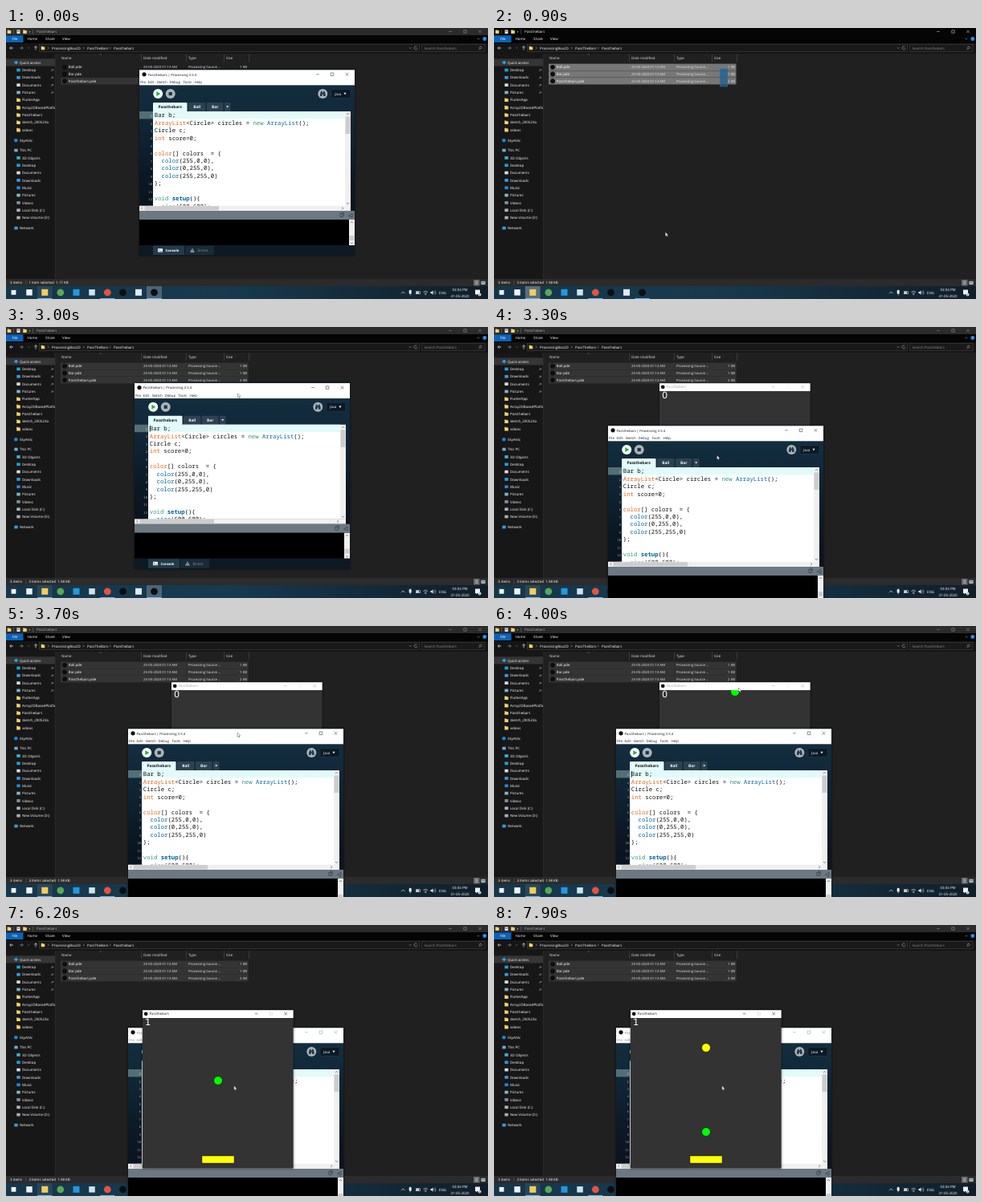
An HTML page for the animation above (8000 ms loop, 600 px wide and 338 px high).

```html
<!DOCTYPE html>
<html lang="en">
<head>
<meta charset="utf-8">
<title>Passthebars</title>
<style>
html, body { margin: 0; width: 100%; height: 100%; overflow: hidden; background: #000; }
svg { display: block; width: 100vw; height: 100vh; }
text { font-family: "Open Sans", "Noto Sans", sans-serif; white-space: pre; text-rendering: geometricPrecision; }
.code { font-family: "Noto Sans Mono", "DejaVu Sans Mono", monospace; }
.score { font-family: "DejaVu Sans", sans-serif; }
.shadow { filter: drop-shadow(0 .6px 1.6px rgba(0, 0, 0, .6)); }
</style>
</head>
<body>
<svg id="stage" viewBox="0 0 600 338" xmlns="http://www.w3.org/2000/svg">
  <defs>
    <linearGradient id="bar"><stop stop-color="#16364a"/><stop offset=".45" stop-color="#173a50"/><stop offset="1" stop-color="#101e29"/></linearGradient>
    <linearGradient id="navy" x2="0" y2="1"><stop stop-color="#15303f"/><stop offset=".22" stop-color="#11293b"/><stop offset=".6" stop-color="#0b1722"/><stop offset="1" stop-color="#080f17"/></linearGradient>
    <clipPath id="sideClip"><rect y="32" width="61" height="281"/></clipPath>
    <clipPath id="codeClip"><rect width="256" height="169.7"/></clipPath>
    <clipPath id="fieldClip"><rect y="10" width="187.6" height="187.6"/></clipPath>
  </defs>
  <g id="explorer"></g>
  <g id="taskbar"></g>
  <g id="windows"><g id="sketch"></g><g id="ide"></g></g>
  <path id="pointer" d="M0 0V5.2L1.2 4.2L2 6L2.9 5.6L2.1 3.9H3.7Z" fill="#fff" stroke="#111" stroke-width=".35"/>
</svg>
<script>
const LOOP = 8000, STEP = 100;
const $ = id => document.getElementById(id);

const rect = (x, y, w, h, fill, extra = '') =>
  `<rect x="${x}" y="${y}" width="${w}" height="${h}" fill="${fill}" ${extra}/>`;
const dot = (x, y, r, fill, extra = '') => `<circle cx="${x}" cy="${y}" r="${r}" fill="${fill}" ${extra}/>`;
const line = (d, stroke, width = .5, extra = '') =>
  `<path d="${d}" fill="none" stroke="${stroke}" stroke-width="${width}" ${extra}/>`;
const shape = (d, fill) => `<path d="${d}" fill="${fill}"/>`;
const text = (x, y, s, fill = '#fff', size = 4.45, extra = '') =>
  `<text x="${x}" y="${y}" font-size="${size}" fill="${fill}" ${extra}>${s.replace(/</g, '&lt;')}</text>`;
const END = 'text-anchor="end"', MID = 'text-anchor="middle"', BOLD = 'font-weight="700"';
const OUTLINE = 'stroke="#000" stroke-width=".35"';

const folder = (x, y) => shape(`M${x - 2.3} ${y - 2.3}h2l.6 .7h2v3.9h-4.6z`, '#f6d26b');

// minimise, maximise and close glyphs centred on three x positions
const controls = (xs, y, r, stroke, midStroke = stroke) =>
  line(`M${xs[0] - r} ${y}h${2 * r}`, stroke) +
  line(`M${xs[1] - r} ${y - r}h${2 * r}v${2 * r}h${-2 * r}z`, midStroke) +
  line(`M${xs[2] - r} ${y - r}l${2 * r} ${2 * r}m0 ${-2 * r}l${-2 * r} ${2 * r}`, stroke);

function drawExplorer() {
  let s = rect(0, 0, 600, 322, '#202020') + rect(0, 0, 600, 32, '#050505') + rect(0, 0, 600, 9, '#2b2b2b', 'id="exBar"') + rect(0, 19, 600, 13, '#151515');
  s += folder(4, 4.7) + line('M9.5 2v5.5', '#777') + rect(13.5, 2.4, 4, 4.6, '#eee') + rect(14.5, 3.4, 2, 1.6, '#d65a3a') +
    folder(23.5, 4.7) + text(28.5, 6.3, '▾', '#bbb', 3.5) + line('M33.5 2v5.5', '#777');
  s += `<g id="exTitle">${text(38, 6.4, 'Passthebars')}${controls([553, 571.5, 590], 4.5, 1.7, '#eee')}</g>`;
  s += rect(0, 9.3, 21.5, 8.7, '#0a63b8') + text(7.5, 15.3, 'File');
  [['Home', 26.5], ['Share', 49], ['View', 70]].forEach(([label, x]) => s += text(x, 15.3, label));
  s += line('M586.5 12.8l1.5 1.5l1.5 -1.5', '#bbb') + dot(595.8, 13.6, 2.5, '#1683dc') + text(595.8, 15, '?', '#fff', 3.8, MID);

  s += line('M9 25H4.8m1.8 -1.8l-1.8 1.8l1.8 1.8', '#eee', .7) + line('M17 25h4.2m-1.8 -1.8l1.8 1.8l-1.8 1.8', '#999', .7) +
    line('M27 24.3l1.2 1.2l1.2 -1.2', '#999') + line('M37 27.5v-4.8m-1.8 1.8l1.8 -1.8l1.8 1.8', '#eee', .7);
  s += rect(41.5, 20.3, 473, 9.4, '#191919', 'stroke="#4a4a4a" stroke-width=".5"') +
    rect(517.5, 20.3, 78.5, 9.4, '#191919', 'stroke="#4a4a4a" stroke-width=".5"') + folder(46, 25);
  [['ProcessingBox2D', 57], ['PassTheBars', 101], ['Passthebars', 134]].forEach(([label, x]) =>
    s += text(x, 26.6, label) + line(`M${x - 5} 23.6l1.3 1.4l-1.3 1.4`, '#bbb'));
  s += line('M502 24.3l1.3 1.3l1.3 -1.3', '#ccc') + line('M511.5 23.6a1.9 1.9 0 1 0 .4 1.7', '#ccc') +
    text(520.5, 26.6, 'Search Passthebars', '#8a8a8a') + dot(590.8, 24.5, 1.4, 'none', 'stroke="#bbb" stroke-width=".5"') + line('M589.8 25.5l-1.5 1.6', '#bbb');

  s += rect(0, 32, 61, 281, '#171717') + line('M61.2 32V313', '#353535');
  const side = (y, label, x = 20, color = '') => {
    const ix = x - 4.5;
    return (color ? rect(ix - 2.2, y - 1.9, 4.4, 3.7, color) : folder(ix, y)) + text(x, y + 1.6, label);
  };
  let nav = rect(0, 38.3, 61, 9.2, '#353535') + shape('M9.7 43l3 -2.4l2.6 2.4l-2.6 2.4z', '#2e9be8') + text(17, 44.7, 'Quick access');
  const items = (top, list) => list.forEach(([label, color], i) => nav += side(top + i * 9.33, label, 20, color));
  items(52.5, [['Desktop', '#1ba5dc'], ['Downloads', '#3b9ce2'], ['Documents', '#d9e0e5'], ['Pictures', '#83b7cf'],
    ['FlutterApp'], ['Array2DBasedPlatformer'], ['Passthebars'], ['sketch_200523a'], ['videos']]);
  for (let i = 0; i < 4; i++) nav += line(`M56.2 ${54 + i * 9.33}l1.4 -1.4m-.6 -1.1l1.7 1.7m-.9 -1.9l1.3 1.3`, '#ccc', .6);
  nav += dot(12.3, 140.2, 2.3, '#1688d8') + text(17, 141.8, 'SkyAttic') + side(152.6, 'This PC', 17, '#6eaad0');
  items(162, [['3D Objects', '#3eb3d4'], ['Desktop', '#1ba5dc'], ['Documents', '#d9e0e5'], ['Downloads', '#3b9ce2'],
    ['Music', '#2586d6'], ['Pictures', '#83b7cf'], ['Videos', '#8493a0'], ['Local Disk (C:)', '#a9bac5'], ['New Volume (D:)', '#b0b0b0']]);
  nav += side(249.6, 'Network', 17, '#3d9bd6');
  s += `<g clip-path="url(#sideClip)">${nav}</g>`;

  [['Name', 69], ['Date modified', 171], ['Type', 227], ['Size', 274]].forEach(([label, x]) => s += text(x, 38.7, label, '#e4e4e4'));
  [168.5, 224.5, 271.5, 302.5].forEach(x => s += line(`M${x} 32.5V42`, '#555'));
  s += line('M116.2 33.8l1.4 -1.2l1.4 1.2', '#999', .4);
  [['Ball.pde', 1], ['Bar.pde', 1], ['Passthebars.pde', 2]].forEach(([name, kb], i) => {
    const y = 48.8 + i * 8.7;
    const cell = (x, label, extra) => text(x, y + 1.6, label, '#e8e8e8', 4.25, extra);
    s += rect(68, y - 4.2, 233.5, 8.4, '#333', 'class="row"') + dot(73, y, 2.9, '#0d0d0d') + text(77.8, y + 1.6, name) +
      cell(171, '25-05-2020 01:13 AM') + cell(227, 'Processing Source ...') + cell(300, kb + ' KB', END);
  });
  s += rect(281.3, 51, 9.5, 22, '#1f618f', 'id="marquee" fill-opacity=".75" stroke="#1a75b8" stroke-width=".5"');
  s += rect(0, 313, 600, 9, '#2b2b2b') + text(5, 319.4, '3 items') + line('M24.8 315v5.5', '#666') +
    `<text id="status" x="28.5" y="319.4" font-size="4.45" fill="#fff"></text>`;
  s += rect(582, 314, 7.5, 7.5, '#686868') + line('M584 316h3.5m-3.5 1.7h3.5m-3.5 1.7h3.5', '#eee') + rect(591.5, 315.8, 5, 4, '#ddd') + rect(592.2, 316.5, 3.6, 2, '#4a8fae');
  $('explorer').innerHTML = s;
}

function drawTaskbar() {
  let s = rect(0, 322, 600, 16, 'url(#bar)') + rect(38.8, 322, 18.8, 16, '#fff', 'id="exTask"') + rect(175, 322, 19, 16, '#fff', 'id="ideTask"');
  [[9.5, '#f4f7fa', 5.8], [29, '#eef1f3', 7.5], [48.3, '#f4cd5b', 8], [87.5, '#2298dc', 8], [107, '#cfe3ef', 7.5], [165, '#dfeaf4', 8]]
    .forEach(([x, color, size]) => s += rect(x - size / 2, 329.8 - size / 2, size, size, color));
  [[67.8, '#57a956'], [126.3, '#e4533f'], [145.5, '#0c0f12'], [184.5, '#0c0f12']].forEach(([x, color]) => s += dot(x, 329.8, 4.4, color));
  [48.3, 126.3, 184.5].forEach(x => s += rect(x - 9, 337, 18, 1, '#76b9ed'));
  s += line('M492 331.2l2.3 -2.3l2.3 2.3', '#eee', .7) + rect(501.7, 326.8, 3, 5, '#eee', 'rx="1.2"') + line('M503.2 331.5v2', '#eee') +
    rect(510.5, 328.7, 5, 3, 'none', 'stroke="#eee" stroke-width=".6"') + rect(511, 329.2, 3, 2, '#eee') +
    line('M519.5 329.5a4 4 0 0 1 5.6 0m-4.3 1.5a2.4 2.4 0 0 1 3 0', '#ddd', .7) + dot(522.3, 332.4, .7, '#eee') +
    shape('M528.5 329h1.3l1.7 -1.6v5.2l-1.7 -1.6h-1.3z', '#eee') + line('M532.6 328.4a2.5 2.5 0 0 1 0 3.2m1.3 -4.3a4 4 0 0 1 0 5.4', '#ddd');
  s += text(539, 331.8, 'ENG') + text(565, 327.8, '03:04 PM', '#fff', 4.45, MID) + text(565, 335.5, '31-05-2020', '#fff', 4.45, MID);
  s += shape('M584 326.5h6v5.5h-3.5l-1.3 1.6v-1.6h-1.2z', '#f0f0f0') + dot(589.5, 332.6, 2, '#d9e4ea') + text(589.5, 333.8, '2', '#222', 3.2, MID);
  $('taskbar').innerHTML = s;
}

const INK = { o: '#e2661a', g: '#33997e', b: '#006699', k: '#111' };
const CODE = [
  'k:Bar b;',
  'o:ArrayList|k:<Circle> circles = |g:new |b:ArrayList|k:();',
  'k:Circle c;',
  'o:int|k: score=0;',
  '',
  'o:color|k:[] colors  = {',
  'b:  color|k:(255,0,0),',
  'b:  color|k:(0,255,0),',
  'b:  color|k:(255,255,0)',
  'k:};',
  '',
  'g:void |B:setup|k:(){',
  'b:  size|k:(600,600);'
];

function drawIde() {
  let s = rect(0, 0, 268, 232, 'url(#navy)', 'class="shadow"') + rect(0, .3, 268, 19, '#fff') + dot(6, 5.8, 2.6, '#111');
  s += `<g id="ideTitle">${text(10.5, 7.5, 'Passthebars | Processing 3.5.4', '#111', 4.25)}`;
  [['File', 1], ['Edit', 10.5], ['Sketch', 21.5], ['Debug', 37.5], ['Tools', 54.5], ['Help', 68.5]]
    .forEach(([label, x]) => s += text(x, 17.2, label, '#222', 4.35));
  s += controls([222, 240, 258.5], 5.8, 1.8, '#222') + '</g>';
  s += dot(23.2, 30, 6, '#fff') + shape('M21.3 27v6l5 -3z', '#20b23c') + dot(38.7, 30, 6, '#a9b5ba') + rect(36.6, 27.9, 4.2, 4.2, '#22333e');
  s += dot(228.3, 30, 6, '#a9b5ba') + shape('M225 33v-3l1.2 -3.3h1.4v1.8h1.4v-1.8h1.4l1.2 3.3v3h-2.6v-2.2h-1.4v2.2z', '#263944');
  s += rect(239, 24.5, 24, 11, '#0c1a26', 'rx="1" stroke="#29404f" stroke-width=".5"') + text(243, 31.7, 'Java', '#fff', 4.4) + shape('M254.5 28.8h3l-1.5 2.4z', '#fff');
  s += rect(17, 41, 42.5, 11.2, '#e3fbfa', 'rx="1"') + text(38.2, 47.8, 'Passthebars', '#111', 4.85, MID + ' ' + BOLD);
  [[61, 21.5, 'Ball'], [84, 20.5, 'Bar'], [106, 7.5, '']].forEach(([x, w, label]) =>
    s += rect(x, 41, w, 11, '#2d4251', 'rx="1"') + text(x + w / 2, 47.8, label, '#f0f4f5', 4.85, MID + ' ' + BOLD));
  s += shape('M108.2 45.2h3l-1.5 2.3z', '#e8eeee');

  s += rect(17, 52, 239, 118, '#fff') + rect(0, 52, 17, 9.4, '#526f76') + rect(17, 52, 239, 9.4, '#e2fbfa');
  s += '<g clip-path="url(#codeClip)">';
  CODE.forEach((row, i) => {
    const y = 59.4 + i * 9.43;
    s += text(16, y - .2, String(i + 1), i ? '#a3b3bb' : '#dce8ea', 3.9, END + ' class="code"');
    const spans = row ? row.split('|').map(part => {
      const key = part[0], body = part.slice(2).replace(/</g, '&lt;');
      return `<tspan fill="${INK[key.toLowerCase()]}"${key === 'B' ? ' ' + BOLD : ''}>${body}</tspan>`;
    }).join('') : '';
    s += `<text class="code" x="18.8" y="${y}" font-size="7.31">${spans}</text>`;
  });
  s += '</g>' + rect(18.8, 53, .8, 8, '#111', 'id="caret"');
  s += rect(256, 52, 7, 118, '#f0f0f0') + rect(256.5, 58.5, 6, 21.5, '#cdcdcd') + line('M258 56l1.5 -1.5l1.5 1.5M258 166l1.5 1.5l1.5 -1.5', '#555', .7);
  s += rect(0, 169.7, 263, 6.3, '#f0f0f0') + rect(6.5, 170.2, 92.5, 5.3, '#cdcdcd') + line('M4 171.3l-1.5 1.5l1.5 1.5M252.3 171.3l1.5 1.5l-1.5 1.5', '#555', .7);
  s += rect(0, 176, 268, 11, '#6c7882') + rect(250, 179.5, 3, 4, 'none', 'stroke="#26333c" stroke-width=".6"') + line('M251.5 179v-1h3v4h-1', '#26333c') + line('M265 179.5l-4.5 2.7l4.5 2z', '#26333c', .6);
  s += rect(0, 187, 268, 32, '#000') + rect(261, 187, 7, 32, '#f0f0f0') + rect(261.5, 207, 6, 6, '#cdcdcd') + line('M263 191l1.5 -1.5l1.5 1.5M263 215.5l1.5 1.5l1.5 -1.5', '#444', .7);
  s += rect(0, 219, 268, 13, '#0d1a24') + rect(17, 219.5, 39, 11.5, '#223b4a') + rect(57, 219.5, 36, 11.5, '#182b37');
  s += rect(23, 223, 6, 4.6, '#e8eeee', 'rx=".5"') + line('M24 224.2l1.2 1l-1.2 1m2 .3h2', '#223b4a') + text(32.5, 226.9, 'Console', '#fff', 4.3, BOLD);
  s += shape('M66 222.5l3 5.2h-6z', '#8e9ca3') + line('M66 224.2v2', '#182b37', .6) + text(72.5, 226.9, 'Errors', '#8e9ca3', 4.6);
  $('ide').innerHTML = s;
}

function drawSketch() {
  $('sketch').innerHTML = rect(0, .2, 187.6, 197.4, '#333', 'class="shadow"') + rect(0, .2, 187.6, 9.8, '#fff') +
    dot(4.2, 4.8, 2.4, '#111') +
    `<g id="skTitle">${text(8.5, 6.4, 'Passthebars', '#111', 4.25)}${controls([141.7, 160, 178.2], 4.7, 1.7, '#111', '#ccc')}</g>` +
    `<text id="score" class="score" x="3.1" y="19" font-size="11.3" fill="#fff"></text>` +
    `<g clip-path="url(#fieldClip)">${['#ff0', '#0f0', '#ff0'].map(c => dot(94, 0, 5.3, c, 'class="ball" ' + OUTLINE)).join('')}</g>` +
    rect(74, 182, 40, 9, '#ff0', OUTLINE);
}

// linear interpolation over [time, ...values] keys
function track(keys, t) {
  const i = keys.findIndex(k => k[0] > t);
  if (i < 0) return keys[keys.length - 1].slice(1);
  if (i === 0) return keys[0].slice(1);
  const [a, b] = [keys[i - 1], keys[i]], f = (t - a[0]) / (b[0] - a[0]);
  return a.slice(1).map((v, n) => v + (b[n + 1] - v) * f);
}

const POINTER = [[100, 360, 80], [300, 388, 57], [500, 291, 73], [700, 281.3, 51], [900, 213.3, 254.5], [1200, 213.3, 254.5],
  [1700, 184, 328], [1800, 184, 328], [2000, 276.5, 92], [2300, 189, 80], [2500, 189, 80], [2900, 292, 57], [3300, 277.5, 160],
  [3700, 288, 133], [4000, 304.5, 77], [4100, 304.5, 77], [4800, 268.5, 113], [5500, 283.8, 200.5]];
const IDE_PATH = [[2900, 166, 52], [3300, 142, 123], [3700, 152, 128]];
const SKETCH_PATH = [[4100, 206, 70], [4800, 170, 106]];
const FALL = [[2700, -33], [4000, 12], [6200, 88], [7900, 152]];
const GAP = 105, BAR_HIT = 176;

drawExplorer();
drawTaskbar();
drawIde();
drawSketch();
const rows = [...document.querySelectorAll('.row')], balls = [...document.querySelectorAll('.ball')];

const show = (el, on) => el.setAttribute('display', on ? 'inline' : 'none');
const place = (el, [x, y]) => el.setAttribute('transform', `translate(${x} ${y})`);

function render(t) {
  const explorerActive = t >= 300 && t < 1900;
  const sketchOpen = t >= 2700;
  const sketchFront = sketchOpen && (t < 2900 || t >= 4100);
  const ideActive = !explorerActive && !sketchFront;
  const allSelected = t >= 600;

  rows.forEach((row, i) => {
    show(row, allSelected || i === 2);
    row.setAttribute('fill', explorerActive ? '#777' : '#343434');
  });
  $('status').textContent = allSelected ? '3 items selected  1.98 KB' : '1 item selected  1.17 KB';
  $('exBar').setAttribute('fill', explorerActive ? '#050505' : '#2b2b2b');
  $('exTitle').setAttribute('opacity', explorerActive ? 1 : .65);
  $('exTask').setAttribute('opacity', explorerActive ? .28 : .08);
  $('ideTask').setAttribute('opacity', explorerActive ? 0 : .22);
  show($('marquee'), t >= 600 && t < 1000);

  const front = sketchFront ? $('sketch') : $('ide');
  if ($('windows').lastElementChild !== front) $('windows').append(front);
  show($('ide'), !explorerActive);
  place($('ide'), track(IDE_PATH, t));
  $('ideTitle').setAttribute('opacity', ideActive ? 1 : .5);
  show($('caret'), ideActive && t >= 1900 && (t + 250) % 1000 < 500);

  show($('sketch'), sketchOpen);
  place($('sketch'), track(SKETCH_PATH, t));
  $('skTitle').setAttribute('opacity', sketchFront ? 1 : .4);
  const [lead] = track(FALL, t);
  balls.forEach((ball, i) => {
    const y = lead + GAP * (1 - i);
    ball.setAttribute('cy', y);
    show(ball, y < BAR_HIT);
  });
  $('score').textContent = lead + GAP < BAR_HIT ? '0' : '1';

  show($('pointer'), t >= 100);
  place($('pointer'), track(POINTER, t));
}

const start = performance.now();
function tick() {
  const t = (performance.now() - start) % LOOP;
  render(Math.floor(t / STEP) * STEP);
  requestAnimationFrame(tick);
}
render(0);
requestAnimationFrame(tick);
</script>
</body>
</html>
```
